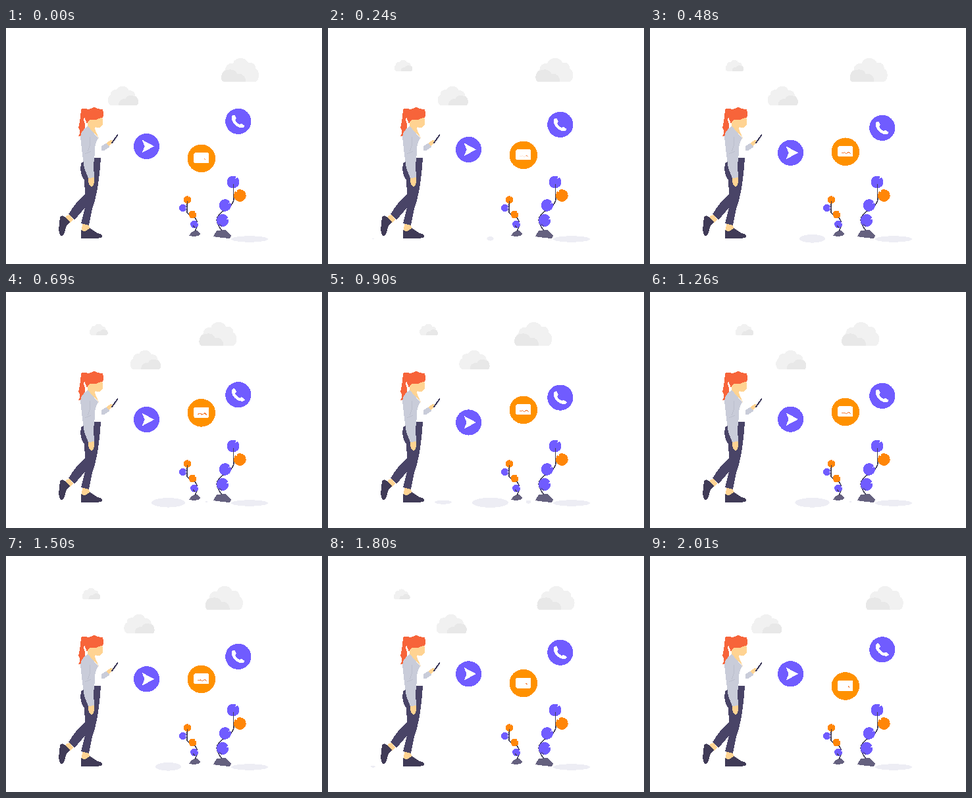
Animation of 480x360 px, one loop 2040 ms. Source, as an HTML page:

```html
<!DOCTYPE html>
<html lang="en">
<head>
<meta charset="utf-8">
<title>Walking with messages</title>
<style>
html, body { margin: 0; width: 100%; height: 100%; overflow: hidden; background: #fff; }
svg { display: block; width: 100vw; height: 100vh; shape-rendering: crispEdges; }
</style>
</head>
<body>
<svg viewBox="0 0 480 360">
  <defs>
    <!-- 57 x 36, standing on its lower left corner -->
    <g id="cloud">
      <path fill="#f1f1f1" d="M5 0C-1 0-1-15 6-18C6-26 13-29 18-28C20-38 37-39 41-29C47-31 53-26 52-20C60-17 58 0 51 0Z"/>
      <path fill="#e8e8e8" d="M4 0C-2 0-2-18 10-18C17-20 23-17 24-12C31-14 38-8 37 0Z"/>
    </g>
  </defs>

  <g fill="#ededf4">
    <ellipse cx="370" cy="322" rx="28" ry="4.7"/>
    <ellipse id="wide" cx="246.5" cy="321.3"/>
    <ellipse id="front" cx="175" cy="320.7"/>
    <ellipse id="dot" cx="304.5" cy="320.3"/>
    <ellipse id="rear" cx="68.5" cy="321.3"/>
  </g>

  <use id="big" href="#cloud"/>
  <use id="mid" href="#cloud"/>
  <use id="small" href="#cloud"/>

  <!-- woman -->
  <g>
    <path fill="#ffd392" d="M124 139L146 136Q149 144 146 149Q142 154 136 151L135 154L141 168L133 165L124 151Z"/>
    <path fill="#fff" d="M129 156L140 167L145 180L144 199L130 201Z"/>
    <path fill="#f7643a" d="M114 124Q119 121 124 124Q129 124 134 120.5Q139 124 147 124Q149 132 147 137Q141 137 137 140Q130 139 126 141L123 146L119 136L118 140Q122 150 119 156Q116 166 110 165Q114 158 110 152Q113 140 114 124Z"/>
    <path fill="#ffd392" d="M92 286L97 285L102 292L97 297L90 292ZM116 296L126 298L127 307L120 313L115 310Z"/>
    <path fill="#494467" d="M114 206Q111 222 119 232L120 254Q107 264 95 284L104 293L120 274L114 298L126 301L131 276Q141 248 144 198H130Z"/>
    <path fill="#ffd392" d="M125 226H134Q135 238 131 242Q124 241 125 226ZM152 176L159 171L162 172L160 177L156 180Z"/>
    <path fill="#c9ccd9" d="M124 150Q114 156 113 166L116 194L119 214L125 229L134 228L133 209L135 190Q134 178 140 168L128 154ZM145 180L152 176L158 181L149 187L145 187Z"/>
    <path fill="none" stroke="#b5b8c8" stroke-width=".7" d="M127 166Q129 178 124 188M120 192L129 188"/>
    <path fill="none" stroke="#3f3b5c" stroke-width="2" d="M160.5 176L170 162.3"/>
    <path fill="#403b57" d="M82 288Q86 284 91 290L98 296Q92 299 90 308Q88 318 83 317Q79 311 81 299ZM114 308Q120 313 127 305L139 313Q147 314 146 319Q142 321 132 321H114Z"/>
  </g>

  <!-- plants -->
  <g fill="none" stroke="#3f3d56" stroke-width="1.6">
    <path d="M275 262V281Q277 285 284 288T291 300L286 313"/>
    <path d="M345 235L346 262Q345 270 333 277T320 293Q321 301 330 312"/>
  </g>
  <path fill="#65617f" d="M278 317L282 311L290 309L295 314L293 317L285 318ZM315 318L320 309L333 308L342 317L340 321L328 320Z"/>
  <g id="balls"></g>

  <!-- bubbles -->
  <g id="send">
    <circle r="19.6" fill="#705cff"/>
    <path fill="#fff" d="M-7-10L11.5 0L-7 10L-3 0Z"/>
  </g>
  <g id="mail">
    <circle r="21.3" fill="#ff9100"/>
    <rect x="-11.5" y="-8.5" width="23" height="16" rx="2" fill="#fff"/>
    <g fill="none" stroke="#f5813c">
      <path id="flap" d="M-6 2L-1 1L1 3L4 1M5 0L8 3"/>
      <path d="M4 0L6 2"/>
    </g>
  </g>
  <g id="call">
    <circle r="19.6" fill="#705cff"/>
    <path fill="#fff" d="M-10-6C-10-9-7-11-5-9L-3-5Q-3-3-5-2Q-2 3 3 5Q4 3 6 4L9 6Q11 8 8 9.5C0 12-11 2-10-6Z"/>
  </g>
</svg>
<script>
const LOOP = 2040, STEP = 30, TURN = 990;
const el = id => document.getElementById(id);
const place = (id, x, y, sx = 1, sy = sx) =>
  el(id).setAttribute('transform', `translate(${x} ${y}) scale(${sx} ${sy})`);
const clamp = v => Math.max(0, Math.min(1, v));
const wrap = t => ((t % LOOP) + LOOP) % LOOP;

// Linear swing: value a at time ta, value b at time tb, and back again.
function swing(t, a, ta, b, tb) {
  const out = wrap(tb - ta), p = wrap(t - ta);
  return a + (b - a) * (p < out ? p / out : (LOOP - p) / (LOOP - out));
}

function shadow(id, width, height) {
  el(id).setAttribute('rx', width / 2);
  el(id).setAttribute('ry', height / 2);
}

// Balls with a small notch cut in the rim: x, y, radius, notch angle, colour
const PURPLE = '#705cff', ORANGE = '#ff8608';
el('balls').innerHTML = [
  [275.5, 262, 5.7, -70, ORANGE], [268.7, 274.5, 5.7, 0, PURPLE],
  [283.5, 284.5, 5.9, -40, ORANGE], [286, 299.5, 5.9, -25, PURPLE],
  [345, 235, 9.4, -55, PURPLE], [355.3, 255.5, 9.4, -130, ORANGE],
  [332.7, 270.5, 9.2, -30, PURPLE], [329, 293.5, 9.4, -18, PURPLE]
].map(([x, y, r, turn, fill]) =>
  `<g transform="translate(${x} ${y}) rotate(${turn}) scale(${r})">
    <circle r="1" fill="${fill}"/><path fill="#fff" d="M.55 0L1.05-.13V.13Z"/></g>`
).join('') + `<path fill="none" stroke="#3f3d56" stroke-width="1.2"
  d="M275.3 264V268M345.2 238V245M284 301L287 305M324 299L328 303"/>`;

function draw(t) {
  const d = Math.abs(t - TURN);

  place('big', swing(t, 328, 2018, 278.3, 998), 82);
  place('mid', swing(t, 154, 2018, 204.5, 998) + 46, 118, -.81, .81);
  const s = clamp((990 - d) / 200);
  place('small', swing(t, 99.5, 2018, 158.7, 998) + 14 * s, 66, -.49 * s, .48 * s);

  place('send', 213.6, swing(t, 177.4, 1893, 201, 1000));
  place('mail', 296.8, swing(t, 199, 2035, 177.7, 1005));
  place('call', 352.8, swing(t, 142.3, 2035, 163.5, 1015));
  el('flap').setAttribute('opacity', clamp((800 - d) / 250));

  const grow = 1 - Math.pow(Math.min(1, d / 810), 2.7);
  shadow('wide', 55 * grow, 15 * Math.sqrt(grow));
  shadow('front', 30 * clamp(1.3 - d / 200), 6 * clamp(1.5 - d / 180));
  shadow('dot', 10 * clamp(1 - d / 450), 6 * clamp(1 - d / 450));
  const rear = clamp(1 - Math.abs(d - 830) / 130);
  shadow('rear', 8.5 * rear, 3 * rear);
}

const start = performance.now();
function tick() {
  const t = (performance.now() - start) % LOOP;
  draw(Math.floor(t / STEP) * STEP);
  requestAnimationFrame(tick);
}
tick();
</script>
</body>
</html>
```
